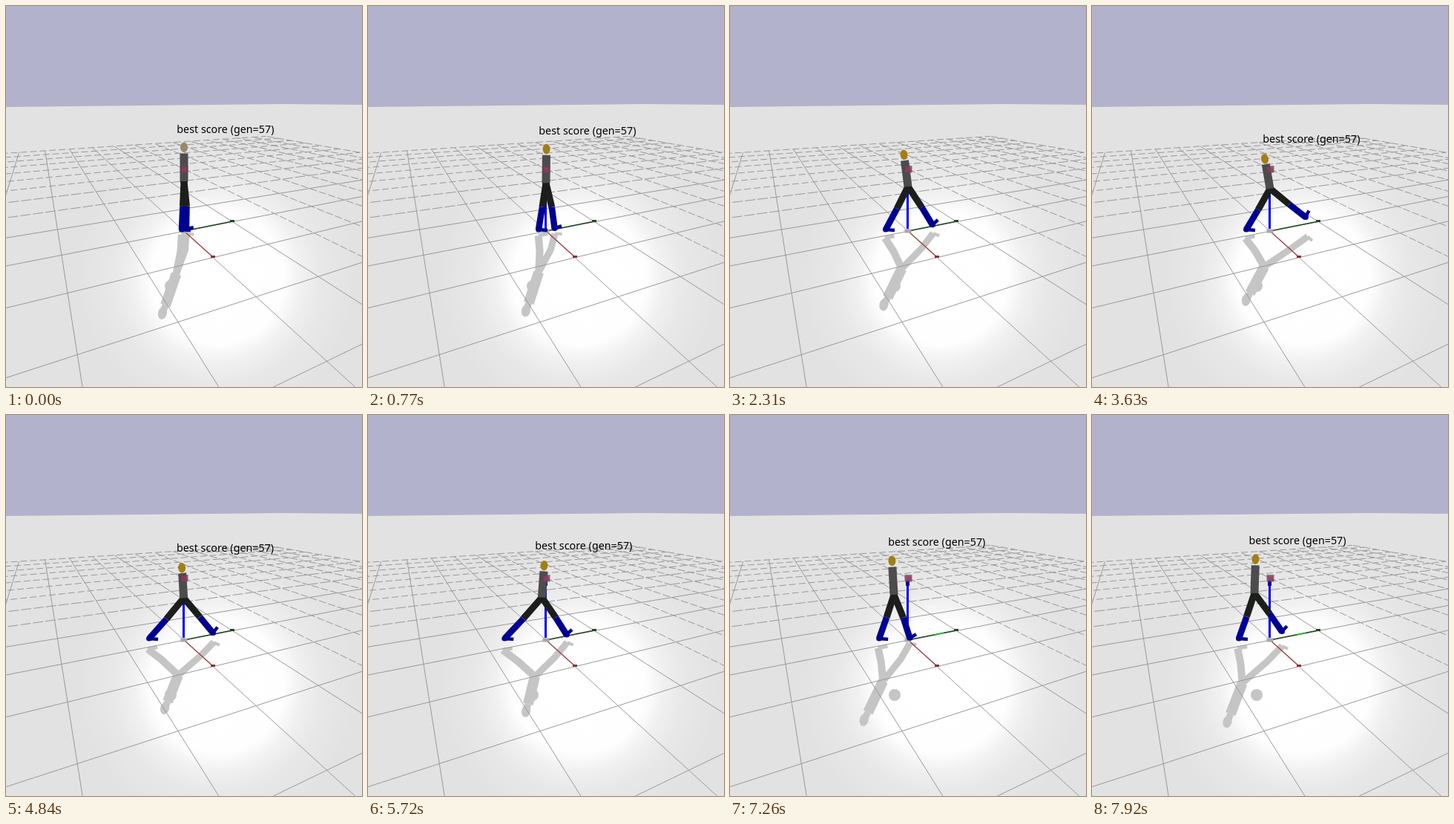
Recreate the animation shown at these times as an HTML page with a canvas. Size 480 by 513 pixels, loop 8 s.

```html
<!DOCTYPE html>
<html lang="en">
<head>
<meta charset="utf-8">
<title>Walker</title>
<style>
html, body { margin: 0; width: 100%; height: 100%; overflow: hidden; }
canvas { display: block; width: 100vw; height: 100vh; }
</style>
</head>
<body>
<canvas id="stage" width="480" height="513"></canvas>
<script>
const c = document.getElementById('stage').getContext('2d');
const LOOP = 8000, STEP = 110;

// Key moments with the sideways lean of the head and the x of both feet
const times = [0, 1430, 2310, 3630, 4840, 5700, 6600, 7350, 7920];
const leans = [0, 1, -5.5, -7, -2.5, 3, 7.5, -4, 1.5];
const backFoot = [237, 224, 210, 208, 193, 184, 195, 202, 198];
const frontFoot = [243, 259, 273, 288, 279, 268, 260, 240, 256];

function track(values, t) {
  let i = 0;
  while (i < times.length - 2 && t >= times[i + 1]) i++;
  const f = Math.min(1, (t - times[i]) / (times[i + 1] - times[i]));
  return values[i] + (values[i + 1] - values[i]) * f;
}

const mix = (p, q, f) => p.map((n, i) => n + (q[i] - n) * f);
const shift = (p, x, y) => [p[0] + x, p[1] + y];

function poseAt(t) {
  const drift = Math.max(0, (t - 4600) / 3300);
  const lift = 7 * Math.max(0, Math.cos((t - 3630) / 4290 * 2 * Math.PI)) ** 3;
  const height = 45.8 - 6 * Math.sin(Math.PI * t / LOOP) ** 3;
  const hip = [
    240 - 21 * drift * drift * (3 - 2 * drift),
    236 + 10.5 * Math.sin(Math.PI * t / 9200) ** 1.15
  ];
  const head = shift(hip, track(leans, t), -height);
  const front = track(frontFoot, t);
  const ankleA = [track(backFoot, t), 301];
  const ankleB = [front, 302 - .22 * (front - 240) - lift];
  const kneeA = shift(mix(hip, ankleA, .5), 0, 1);
  const kneeB = shift(mix(hip, ankleB, .5), 2, 2);
  const pitch = Math.atan2(ankleB[1] - kneeB[1], ankleB[0] - kneeB[0]) - 1.78;
  return {
    hip, head, kneeA, ankleA, kneeB, ankleB,
    neck: mix(hip, head, .82),
    toeA: shift(ankleA, 12, 1),
    toeB: shift(ankleB, 10 * Math.cos(pitch), 10 * Math.sin(pitch))
  };
}

function line(color, width, ...pts) {
  c.strokeStyle = color;
  c.lineWidth = width;
  c.beginPath();
  pts.forEach(p => c.lineTo(p[0], p[1]));
  c.stroke();
}

function oval(color, [x, y], rx, ry, turn = 0) {
  c.fillStyle = color;
  c.beginPath();
  c.ellipse(x, y, rx, ry, turn, 0, 7);
  c.fill();
}

function box(color, x, y, w, h) {
  c.fillStyle = color;
  c.fillRect(x, y, w, h);
}

function drawGround() {
  const glow = c.createRadialGradient(285, 366, 0, 285, 366, 190);
  glow.addColorStop(0, '#fff');
  glow.addColorStop(.47, '#fefefe');
  glow.addColorStop(.59, '#f1f1f1');
  glow.addColorStop(.74, '#e8e8e8');
  glow.addColorStop(1, '#e2e2e2');
  box(glow, 0, 0, 480, 513);
  c.fillStyle = '#b2b2cc';
  c.beginPath();
  [[0, 0], [480, 0], [480, 133], [372, 132], [0, 136]].forEach(p => c.lineTo(...p));
  c.fill();
}

// Ground lines meet at two vanishing points on the horizon y = 122
const slopeA = v => 1.099 + .47 * v, slopeB = u => 5.13 - 1.02 * u;
const depth = (a, b) => 1129 / (a + b);

function drawGrid() {
  for (let v = -3; v <= 10; v++) {
    const a = slopeA(v), d = depth(a, slopeB(-10));
    c.setLineDash(v < 2 ? [] : [10, 3]);
    line('#999', 1, [41 + a * 400, 522], [41 + a * d, 122 + d]);
  }
  for (let u = -10; u <= 3; u++) {
    const b = slopeB(u), d = depth(slopeA(10), b);
    c.setLineDash(u > -2 ? [] : u > -4 ? [14, 3] : [9, 4]);
    line('#999', 1, [1170 - b * 400, 522], [1170 - b * d, 122 + d]);
  }
  c.setLineDash([]);
}

// Where the light throws a point of the figure onto the ground
function cast([x, y]) {
  const ground = 305 - .1 * (x - 240), h = Math.max(0, ground - y);
  return [
    x - .0022 * h * h + (x - 240) * .0045 * h,
    ground + h * (.6 + .003 * h)
  ];
}

function drawShadow(p) {
  const gray = '#c5c5c5';
  const limb = (w, ...pts) => line(gray, w, ...pts.map(cast));
  limb(10, p.hip, p.kneeA, p.ankleA);
  limb(9, p.hip, p.kneeB, p.ankleB);
  limb(5, p.ankleA, p.toeA);
  limb(4, p.ankleB, p.toeB);
  limb(14, p.hip, p.neck);
  limb(9, p.neck, p.head);
  oval(gray, cast(p.head), 6, 8.5, .25);
  oval(gray, [222, 377], 8, 8);
}

function drawAxes(t) {
  line('#a03c40', 1.2, [240, 303], [279, 338]);
  line('#1c481c', 1.3, [240, 303], [305, 290]);
  if (t > 6000) line('#10d010', 1.3, [276, 296], [288, 293.4]);
  box('#8c3034', 276, 336, 6, 3);
  box('#1c4a20', 302, 288, 6, 3);
  box('#a8a8a8', 235.5, 300.5, 9, 5);
  line('#0000ec', 3, [239.5, 300], [239.5, 222]);
  box('#0000a4', 237, 224, 5, 6);
}

function drawWalker(p, headColor) {
  const leg = (knee, ankle, toe) => {
    line('#1c1e1c', 9, p.hip, knee);
    line('#000092', 8.5, knee, ankle);
    oval('#000092', ankle, 4, 3.5);
    line('#000092', 4.5, ankle, toe);
  };
  leg(p.kneeA, p.ankleA, p.toeA);
  leg(p.kneeB, p.ankleB, p.toeB);
  oval('#1c1e1c', p.hip, 5, 5);
  line('#4c4c4c', 11, p.hip, p.neck);
  const lean = Math.atan2(p.head[0] - p.hip[0], p.hip[1] - p.head[1]);
  oval(headColor, p.head, 5, 6.8, lean);
}

function drawCube() {
  c.globalAlpha = .7;
  box('#5a4650', 235.5, 215, 10, 9.5);
  box('#9c3864', 236.5, 217, 8, 7);
  c.globalAlpha = 1;
}

function draw(now) {
  const frame = Math.floor(now % LOOP / STEP), t = frame * STEP;
  const p = poseAt(t);
  drawGround();
  drawShadow(p);
  drawGrid();
  drawAxes(t);
  drawWalker(p, frame % 20 ? '#a27e18' : '#98886c');
  drawCube();
  // The label flickers off briefly
  if (frame % 8 !== 5) {
    c.fillStyle = '#000';
    c.font = '14.3px "Noto Sans", sans-serif';
    c.fillText('best score (gen=57)', 230.3 - .9 * (240 - p.hip[0]), 170.5 + (p.head[1] - 190) * .83);
  }
}

const start = performance.now();
function tick() {
  draw(performance.now() - start);
  requestAnimationFrame(tick);
}
tick();
</script>
</body>
</html>
```
